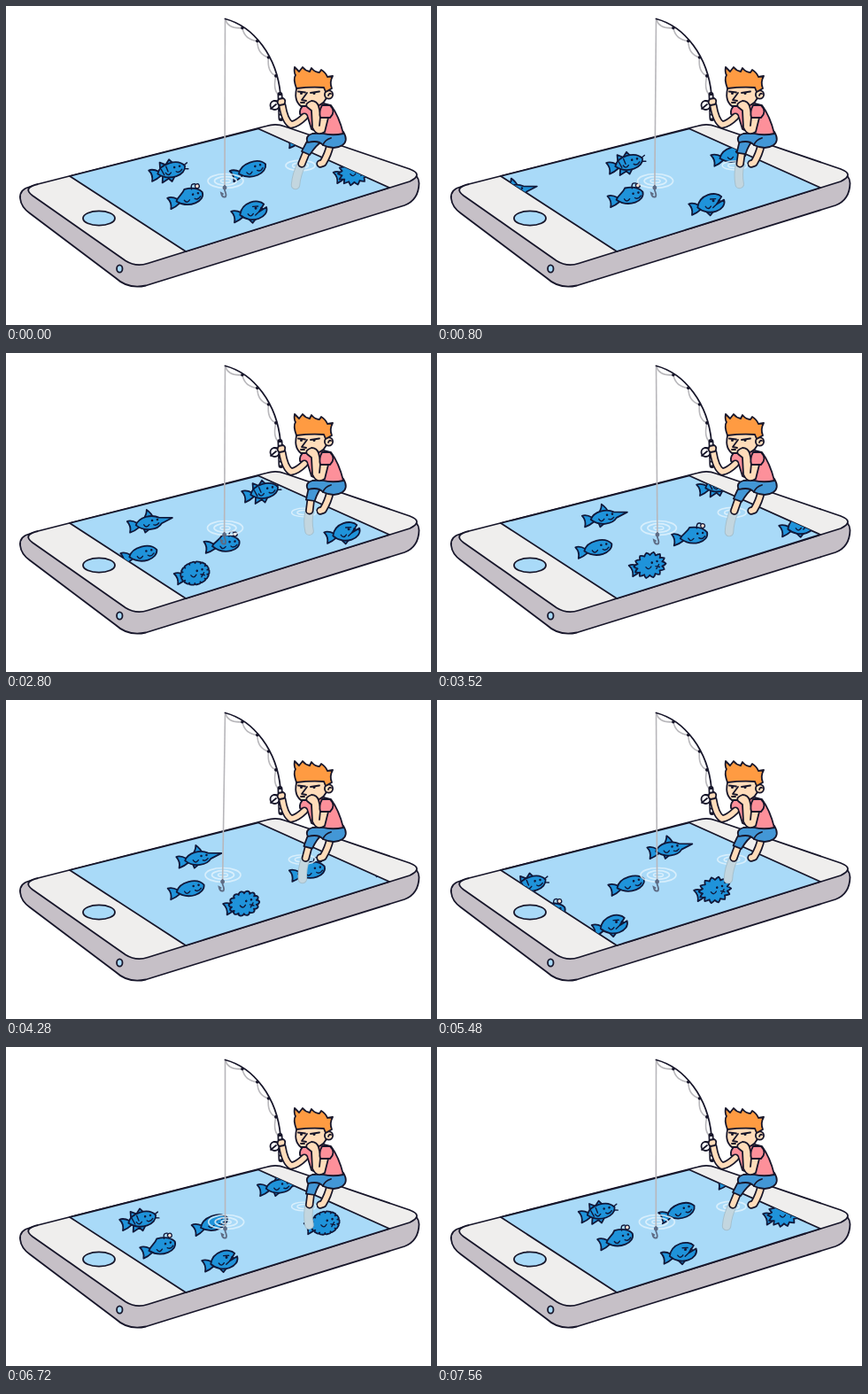
An HTML page that plays this animation: 480 px wide and 360 px high, repeating every 7.6 s.

```html
<!DOCTYPE html>
<html lang="en">
<head>
<meta charset="utf-8">
<title>Fishing in a phone</title>
<style>
  html, body { margin: 0; width: 100%; height: 100%; overflow: hidden; background: #fff; }
  svg { display: block; width: 100vw; height: 100vh; }
  .ink { stroke: #17162a; stroke-width: 1.8; stroke-linejoin: round; stroke-linecap: round; }
  .none { fill: none; }
  .dark { fill: #17162a; }
  .skin { fill: #ffdcba; }
  .pink { fill: #fd909a; }
  .blue { fill: #4397d6; }
  .fish { fill: #1f93da; stroke: #10183a; stroke-width: 1.8; stroke-linejoin: round; stroke-linecap: round; }
  .fish .face { fill: none; stroke-width: 1.4; }
  .fish .dot { fill: #10183a; stroke: none; }
  .fish .lure { fill: #fde3d4; stroke-width: 1.3; }
  .ripple { fill: none; stroke: #e0f2fd; stroke-width: 1.7; opacity: .85; }
  .thread { fill: none; stroke: #b8b7bb; stroke-width: 1.6; }
</style>
</head>
<body>
<svg viewBox="0 0 480 360">
  <defs>
    <clipPath id="water"><path id="screen" d="M72 192L285 138.500L433 205L203 277Z"/></clipPath>
  </defs>

  <g class="ink">
    <path fill="#c6c0c7" d="M27 204Q15 207 16 217Q17 227 27 234L124 307Q138 320 158 315.500L450 225Q466 219 466.500 200Q466 190 456 187Z"/>
    <path fill="#efeeed" d="M36 201L294 135.500Q305 132 315 136L456 184Q472 190 456 198L160 290.500Q147 295 135 287.500L30 214Q18 205 36 201Z"/>
    <use href="#screen" fill="#a9daf8"/>
    <ellipse fill="#a9daf8" cx="105" cy="239.500" rx="18" ry="8.200"/>
    <ellipse fill="#a9daf8" cx="128.300" cy="296.500" rx="3.200" ry="4.200"/>
  </g>

  <g clip-path="url(#water)"><g id="shoal"></g></g>

  <g id="lineRipple">
    <ellipse class="ripple" rx="20" ry="8"/>
    <ellipse class="ripple" rx="12.500" ry="4.800"/>
    <ellipse class="ripple" rx="5.500" ry="2"/>
  </g>
  <path id="thread" class="thread"/>
  <g id="hook" fill="none" stroke="#5d6b84" stroke-width="1.8" stroke-linecap="round">
    <path d="M0 -7V-2Q3 5 0 5.500Q-3 6 -4 1L-2 2"/>
    <circle r="1.500" cy="-5"/>
  </g>

  <path id="slack" class="thread"/>
  <path id="rod" class="ink none" d="M247.500 14.500C280 23 306 57 310 100"/>
  <g id="guides"></g>
  <path class="none" stroke="#17162a" stroke-width="6" stroke-linecap="round" d="M309.500 100L310.500 127"/>
  <path class="none" stroke="#fff" stroke-width="2.500" d="M310 119v2.500M310.300 123.500v3M309.600 101v3"/>
  <circle class="ink" fill="#fff" cx="303.500" cy="112" r="5"/>
  <path class="ink none" d="M299 116L305 111M303 107L309 108"/>

  <g id="backLeg"></g>
  <g id="footRipple">
    <ellipse class="ripple" rx="16.500" ry="5.800"/>
    <ellipse class="ripple" rx="9" ry="3"/>
  </g>
  <g id="frontLeg"></g>
  <path class="ink blue" d="M346 144Q337 147 341 154Q353 151 358 157Q371 163 380 157Q387 152 381 142Z"/>
  <path class="ink none" d="M358 157Q360 151 367 149"/>
  <path class="ink pink" d="M337 111Q331 116 332 122L341 126L345 139Q362 148 381 144Q376 124 367 112Q352 107 337 111Z"/>
  <g id="rodArm"></g>
  <path class="ink skin" d="M308 105Q305 110 309 112L314 111Q317 106 313 104Z"/>
  <path class="ink skin" d="M329 90Q324 106 333 113L351 113Q361 110 363 100L360 86H331Z"/>
  <circle class="ink skin" cx="364.500" cy="100" r="4.600"/>
  <path class="ink none" d="M364 101Q365 98 367 99"/>
  <path class="ink" fill="#ff9b42" d="M328 93Q324 82 327 78Q325 75 326 69L331 74L335 69Q338 73 343 74L345 70Q349 75 354 75L356 72Q361 75 363 80L369 79Q365 86 368 93L361 97L359 92Q344 91 328 93Z"/>
  <path class="ink none" d="M330 96.500L338 97.500M344 98L354 96.500M340 98L334 106L339 107M333 109L337 109"/>
  <circle class="dark" cx="333.500" cy="98.500" r="1.500"/>
  <circle class="dark" cx="348" cy="98.500" r="1.500"/>
  <path class="ink skin" d="M345 107Q337 110 340 114L345 118L346 137Q351 148 360 142L364 126L356 125L353 113Q351 107 345 107Z"/>
  <path class="ink none" d="M355 125L354 135"/>
  <path class="ink pink" d="M357 112Q353 119 355 126L366 126Q373 119 366 112Z"/>
</svg>

<script>
const LOOP = 7600, SWAY = 1900, STEP = 40;
const SPEED = .0375;                        // px per ms
const BAIT = { x: 303, reach: 109, lag: 67 };

const byId = id => document.getElementById(id);
const move = (id, value) => byId(id).setAttribute('transform', value);
const ease = u => u * u * (3 - 2 * u);

const stroke = (d, color, width) =>
  `<path d="${d}" fill="none" stroke="${color}" stroke-width="${width}" stroke-linecap="round" stroke-linejoin="round"/>`;
const limb = (d, width, skin = '#ffdcba', edge = '#17162a', rim = 3.4) =>
  stroke(d, edge, width + rim) + stroke(d, skin, width);

byId('rodArm').innerHTML = limb('M337 125Q329 133 322 134Q315 130 312 112', 5.5);
byId('backLeg').innerHTML = limb('M366 157Q364 167 358 177L355 178', 6);
byId('frontLeg').innerHTML =
  limb('M334 178Q328 190 327 202', 8.5, '#c3d6df', '#a5c0ce', 2) +
  limb('M343 156L334 178', 6) +
  '<path class="ink blue" d="M345 145Q338 155 334 164L343 168Q350 157 357 153Q354 142 345 145Z"/>';

// Guides at even steps along the rod, with slack thread between them.
function rigRod() {
  const rod = byId('rod'), count = 5, size = rod.getTotalLength();
  let last = rod.getPointAtLength(0), slack = `M${last.x} ${last.y}`;
  for (let i = 1; i <= count; i++) {
    const p = rod.getPointAtLength(size * i / count);
    slack += `Q${(last.x + p.x) / 2 - 7} ${(last.y + p.y) / 2 + 7} ${p.x - 1} ${p.y + 1}`;
    if (i < count) byId('guides').innerHTML += `<circle class="dark" cx="${p.x - 1}" cy="${p.y + 1}" r="1.8"/>`;
    last = p;
  }
  byId('slack').setAttribute('d', slack);
}
rigRod();

const TAIL = '<path d="M-10 -2Q-16 -7 -21 -6Q-17 0 -20 7Q-14 6 -9 3Z"/>';
const BODY = '<path d="M-12 0C-7 -11 14 -12 20 -2C19 8 0 12 -12 0Z"/>';
const FIN = '<path class="face" d="M-3 1Q-1 6 3 2"/>';
const eyes = (x, y) => [x, x + 6].map(cx => `<circle class="dot" cx="${cx}" cy="${y}" r="1.3"/>`).join('');
const FACE = FIN + eyes(8, -3) + '<path class="face" d="M9 2Q12 5 16 1"/>';

const looks = {
  cat: `<path d="M-8 -5L-7 -12L-1 -8L4 -13L8 -7ZM-7 4L-9 11L-1 8L2 12L7 6Z"/>${TAIL}${BODY}${FACE}
    <path class="face" d="M19 -3L23 -5M19 1L23 2M-7 -4L-5 3M-1 -6L0 0"/>`,
  angler: `${TAIL}<path d="M-12 0C-9 -5 -3 -6 0 -11Q14 -11 19 -3C20 8 0 12 -12 0Z"/>${FACE}
    <path class="face" d="M8 -9Q8 -16 13 -14"/><circle class="lure" cx="15" cy="-11" r="2.4"/>`,
  plain: TAIL + BODY + FACE,
  piranha: `<path d="M-4 6L0 12L6 7Z"/>${TAIL}
    <path d="M-12 0C-7 -14 12 -14 17 -6L10 1L19 -2C20 10 -2 14 -12 0Z"/>${FIN}
    <path class="face" d="M10 1L5 4M12 0L13 -3L15 -1M4 -6L10 -5"/><circle class="dot" cx="7" cy="-3.500" r="1.500"/>`,
  puffer: `${TAIL}<path class="puff"/>${FIN}${eyes(5, -2)}
    <path class="face" d="M8 3L12 5M12 2L8 6"/>`,
  sword: `<path d="M-3 -5Q2 -9 3 -15Q8 -10 9 -4ZM-4 5L-3 10L4 6Z"/>${TAIL}
    <path d="M-12 0C-7 -9 8 -9 15 -4L30 -1L17 3C12 9 -3 10 -12 0Z"/>${FIN}${eyes(7, -2)}
    <path class="face" d="M8 3Q11 5 14 2"/>`
};

// Where and when each fish swims in, how steeply, and how a curious one veers at the bait.
const shoal = [
  { kind: 'sword', start: 333, x: 66, y: 214, slope: .235 },
  { kind: 'cat', start: 4720, x: 75, y: 217, slope: .28 },
  { kind: 'plain', start: 1677, x: 109, y: 238.5, slope: .25, veer: -16 },
  { kind: 'angler', start: 5253, x: 118, y: 244, slope: .31, veer: 22 },
  { kind: 'piranha', start: 4373, x: 155, y: 267, slope: .28 },
  { kind: 'puffer', start: 1160, x: 150, y: 270, slope: .34 }
];
for (const fish of shoal) {
  fish.g = document.createElementNS('http://www.w3.org/2000/svg', 'g');
  fish.g.setAttribute('class', 'fish');
  fish.g.innerHTML = looks[fish.kind];
  byId('shoal').append(fish.g);
}
const puff = document.querySelector('.puff');

// Straight lanes; a curious fish lingers near the bait, then catches up.
function swim({ g, start, x, y, slope, veer = 0 }, t) {
  const lane = x + SPEED * ((t - start + LOOP) % LOOP);
  const u = Math.max(-1, Math.min(1, (lane - BAIT.x) / BAIT.reach));
  const interest = veer ? Math.cos(u * Math.PI / 2) ** 2 : 0;
  const px = lane - BAIT.lag * interest;
  const py = y - slope * (px - x) + veer * ease((u + 1) / 2);
  const tilt = 3 - Math.atan(slope) * 180 / Math.PI + .4 * veer * interest;
  g.setAttribute('transform', `translate(${px} ${py}) rotate(${tilt})`);
}

// Spiky at sharp = 1, woolly at sharp = 0.
function pufferPath(sharp) {
  const n = 14, tip = 1.02 + .16 * sharp, dip = .9;
  const turn = 2 * Math.PI / n;
  const at = (angle, r) => [2 + 16 * r * Math.cos(angle), 12.5 * r * Math.sin(angle)];
  const mix = (p, q) => p.map((v, k) => v + (q[k] - v) * (1 - sharp));
  let d = 'M' + at(0, dip);
  for (let i = 0; i < n; i++) {
    const from = i * turn, to = from + turn, mean = (tip + dip) / 2;
    const rise = mix(at(from + turn / 4, mean), at(from, tip + .06));
    const fall = mix(at(to - turn / 4, mean), at(to, tip + .06));
    d += `Q${rise} ${at(from + turn / 2, tip)}Q${fall} ${at(to, dip)}`;
  }
  return d + 'Z';
}

function draw(t) {
  const phase = 2 * Math.PI * t / SWAY;
  const sway = Math.sin(phase), swing = (1 - Math.cos(phase)) / 2;

  shoal.forEach(fish => swim(fish, t));
  puff.setAttribute('d', pufferPath(1 - swing));

  const hookX = 247 - 2.4 * sway;
  byId('thread').setAttribute('d', `M247.5 14.5L${hookX} 206`);
  move('hook', `translate(${hookX} 210)`);
  move('lineRipple', `translate(${248 - 3 * sway} 197.5)`);

  move('frontLeg', `translate(348 148) scale(1 ${1 - .08 * swing}) rotate(${-16 * swing}) translate(-348 -148)`);
  move('footRipple', `translate(${332.5 + 4 * swing} 180) scale(${1 - .16 * swing})`);
}

const begin = performance.now();
function tick() {
  const t = (performance.now() - begin) % LOOP;
  draw(Math.floor(t / STEP) * STEP);
  requestAnimationFrame(tick);
}
draw(0);
requestAnimationFrame(tick);
</script>
</body>
</html>
```
